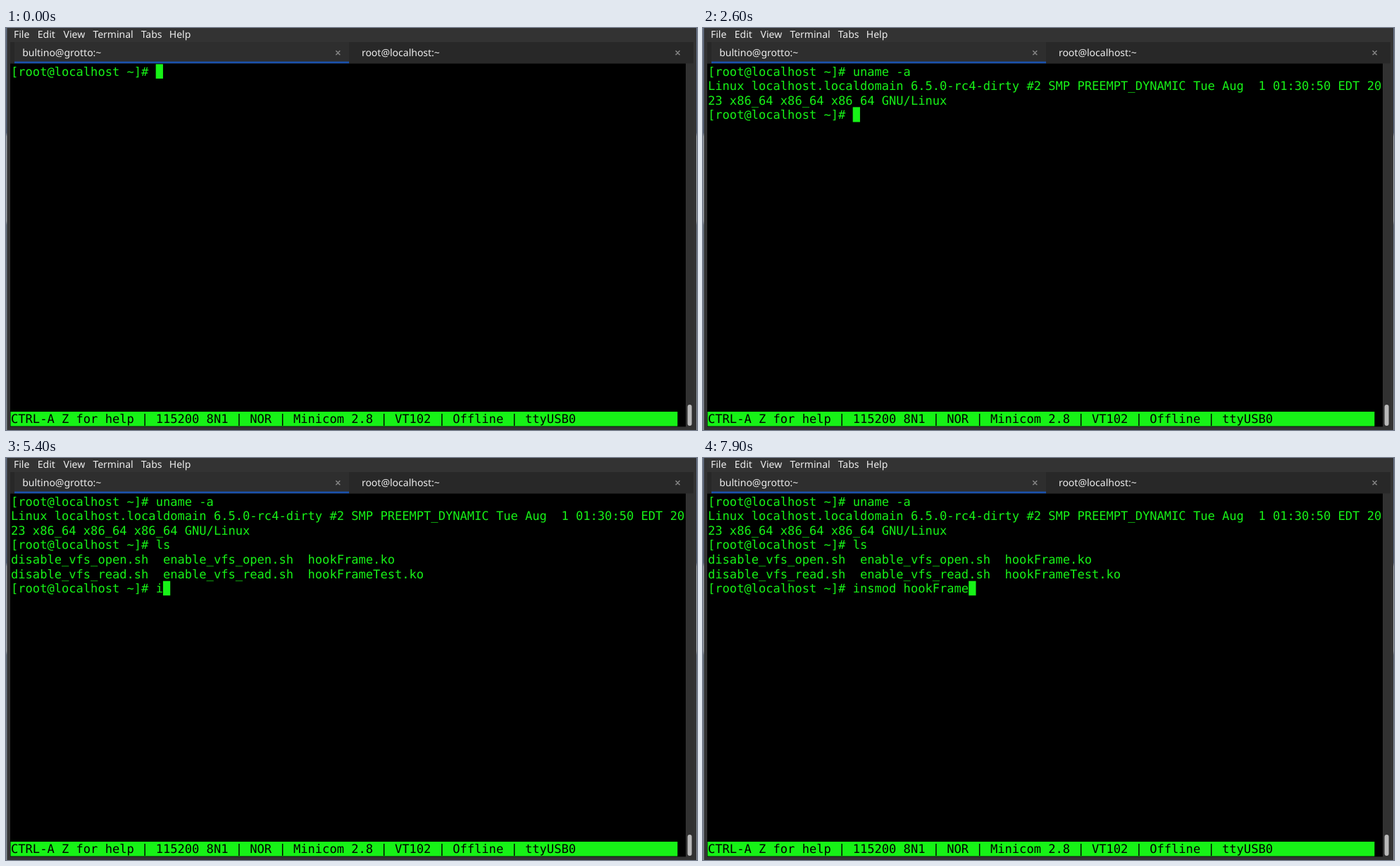
Recreate the animation shown at these times as an HTML page. Size 981 by 571 pixels, loop 8000 ms.

```html
<!DOCTYPE html>
<html lang="en">
<head>
<meta charset="utf-8">
<title>Serial terminal</title>
<style>
  html, body { margin: 0; width: 100%; height: 100%; overflow: hidden; background: #333; }
  svg { display: block; width: 100%; height: 100%; }
  text { white-space: pre; text-rendering: geometricPrecision; }
  .ui { font: 14px "Noto Sans", sans-serif; fill: #eee; }
  .term { font: 17.08px "DejaVu Sans Mono", monospace; fill: #17f217; }
  .green { fill: #17f217; }
  .close { stroke: #8c8c8c; stroke-width: 1.3; fill: none; }
</style>
</head>
<body>
<svg viewBox="0 0 981 571" preserveAspectRatio="none">
  <defs>
    <linearGradient id="edge" x1="0" y1="0" x2="0" y2="1">
      <stop offset="0" stop-color="#66738a"/>
      <stop offset=".26" stop-color="#56647c"/>
      <stop offset=".27" stop-color="#a2a8b0"/>
      <stop offset=".48" stop-color="#a2a8b0"/>
      <stop offset=".49" stop-color="#6c7888"/>
      <stop offset="1" stop-color="#8d95a0"/>
    </linearGradient>
  </defs>
  <rect width="981" height="571" fill="#333"/>
  <rect width="1.4" height="571" fill="url(#edge)"/>
  <rect x="980" width="1" height="571" fill="url(#edge)"/>

  <g class="ui">
    <text x="10.9" y="14">File</text>
    <text x="44.8" y="14">Edit</text>
    <text x="81.6" y="14">View</text>
    <text x="123.4" y="14">Terminal</text>
    <text x="191.7" y="14">Tabs</text>
    <text x="231.8" y="14">Help</text>
  </g>

  <rect x="6" y="20" width="970" height="30.5" fill="#282828"/>
  <rect x="12" y="20" width="475" height="30.5" fill="#2e2e2e"/>
  <rect x="12" y="47.6" width="475" height="2.9" fill="#1b52ac"/>
  <g class="ui">
    <text x="23.2" y="40">bultino@grotto:~</text>
    <text x="504.9" y="40">root@localhost:~</text>
  </g>
  <path class="close" d="M468.3 32.2l6 6m0-6l-6 6M950.6 32.2l6 6m0-6l-6 6"/>

  <rect x="6" y="50.5" width="959" height="515.8" fill="#000"/>
  <rect x="965" y="50.5" width="11" height="515.8" fill="#313131"/>
  <rect x="967.6" y="535" width="6" height="30" rx="3" fill="#b9b9b9"/>

  <g id="rows" class="term"></g>
  <rect id="cursor" class="green"/>
  <rect id="bar" class="green"/>
  <text id="status" class="term" style="fill:#000">CTRL-A Z for help | 115200 8N1 | NOR | Minicom 2.8 | VT102 | Offline | ttyUSB0</text>
</svg>
<script>
const LOOP = 8000, LEFT = 7, TOP = 51.3, COL = 10.283, ROW = 20.57, ASCENT = 16.4;
const PROMPT = "[root@localhost ~]# ";

// Each entry: command, key times (one per character), Enter time, output.
const session = [
  { cmd: "uname -a",
    keys: [600, 1000, 1100, 1200, 1300, 1900, 2100, 2300],
    enter: 2600,
    out: ["Linux localhost.localdomain 6.5.0-rc4-dirty #2 SMP PREEMPT_DYNAMIC Tue Aug  1 01:30:50 EDT 20",
          "23 x86_64 x86_64 x86_64 GNU/Linux"] },
  { cmd: "ls",
    keys: [3700, 3800],
    enter: 4000,
    out: ["disable_vfs_open.sh  enable_vfs_open.sh  hookFrame.ko",
          "disable_vfs_read.sh  enable_vfs_read.sh  hookFrameTest.ko"] },
  { cmd: "insmod hookFrame",
    keys: [5400, 5500, 5700, 5700, 5900, 6000, 6100, 6500, 6600, 6700,
           7000, 7300, 7500, 7700, 7800, 7900],
    enter: Infinity,
    out: [] }
];

const byId = id => document.getElementById(id);
const set = (el, attrs) => {
  for (const name in attrs) el.setAttribute(name, attrs[name]);
};
const rowTop = i => TOP + i * ROW;

const rows = Array.from({ length: 7 }, (_, i) => {
  const el = document.createElementNS("http://www.w3.org/2000/svg", "text");
  set(el, { x: LEFT, y: rowTop(i) + ASCENT });
  return byId("rows").appendChild(el);
});
const cursor = byId("cursor");
set(cursor, { width: COL, height: ROW });
set(byId("bar"), { x: LEFT - 0.5, y: rowTop(24), width: 92 * COL + 0.8, height: ROW });
set(byId("status"), { x: LEFT, y: rowTop(24) + ASCENT });

function screenAt(t) {
  const lines = [];
  for (const { cmd, keys, enter, out } of session) {
    lines.push(PROMPT + cmd.slice(0, keys.filter(k => k <= t).length));
    if (t < enter) break;
    lines.push(...out);
  }
  return lines;
}

function draw(t) {
  const lines = screenAt(t);
  rows.forEach((el, i) => {
    const line = lines[i] || "";
    if (el.textContent !== line) el.textContent = line;
  });
  const last = lines.length - 1;
  set(cursor, { x: LEFT + lines[last].length * COL, y: rowTop(last) });
}

const start = performance.now();
function tick() {
  draw((performance.now() - start) % LOOP);
  requestAnimationFrame(tick);
}
tick();
</script>
</body>
</html>
```
